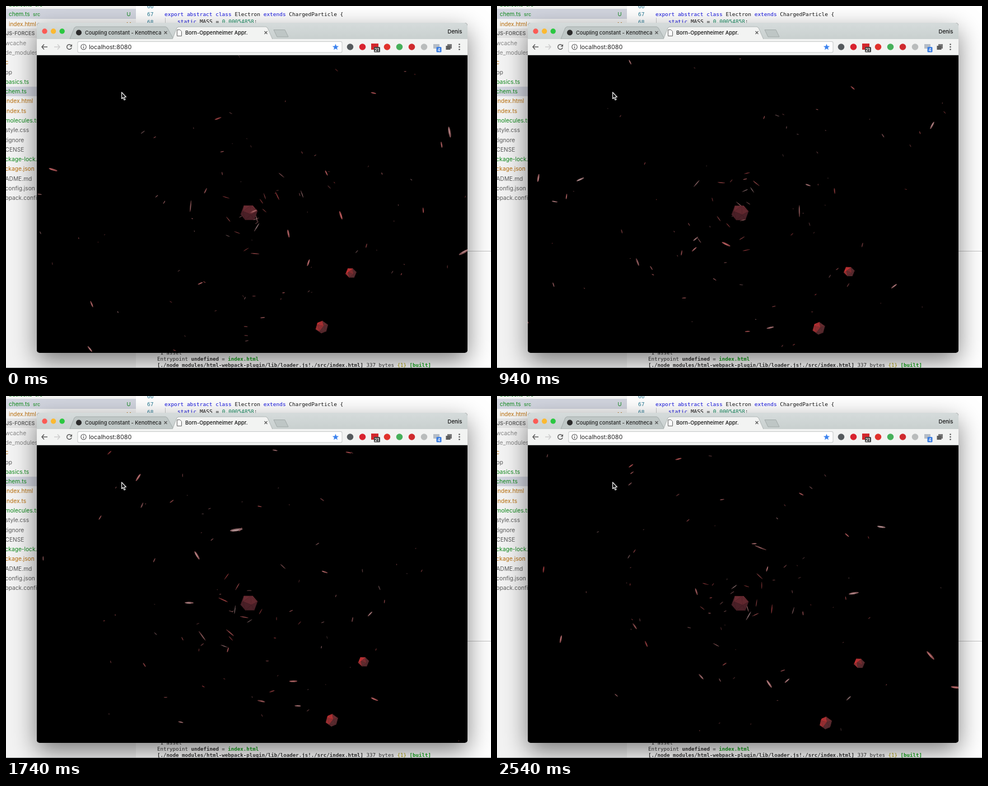
Write an HTML page with a canvas that moves like this. It is 866 px wide and 646 px high and loops after 2560 ms.

```html
<!DOCTYPE html>
<html lang="en">
<head>
<meta charset="utf-8">
<title>Electrons</title>
<style>
html, body { margin: 0; width: 100%; height: 100%; overflow: hidden; background: #fff; }
canvas { display: block; }
</style>
</head>
<body>
<canvas id="stage" width="866" height="646"></canvas>
<script>
const W = 866, H = 646, LOOP = 2560, STEP = 20, TAU = 2 * Math.PI;
const VIEW = { x: 55, y: 88, w: 769, h: 530 };
const CENTER = { x: 434, y: 369 };
const UI = 'Inter, Roboto, sans-serif';
const MONO = '"DejaVu Sans Mono", monospace';
const ctx = document.getElementById('stage').getContext('2d');
const backdrop = document.createElement('canvas');
backdrop.width = W;
backdrop.height = H;
const g = backdrop.getContext('2d');

// ---------- static desktop ----------
function box(x, y, w, h, color) {
  g.fillStyle = color;
  g.fillRect(x, y, w, h);
}

function rounded(x, y, w, h, r, color) {
  g.fillStyle = color;
  g.beginPath();
  g.roundRect(x, y, w, h, r);
  g.fill();
}

function disc(x, y, r, color) {
  g.fillStyle = color;
  g.beginPath();
  g.arc(x, y, r, 0, TAU);
  g.fill();
}

function shape(points, fill, stroke, c = g) {
  c.beginPath();
  points.forEach(([x, y]) => c.lineTo(x, y));
  c.closePath();
  if (fill) { c.fillStyle = fill; c.fill(); }
  if (stroke) { c.strokeStyle = stroke; c.stroke(); }
}

function line(points, color, width = 1) {
  g.strokeStyle = color;
  g.lineWidth = width;
  g.beginPath();
  points.forEach(([x, y]) => g.lineTo(x, y));
  g.stroke();
}

function text(str, x, y, size, color, family = UI, weight = 400) {
  g.font = `${weight} ${size}px ${family}`;
  g.fillStyle = color;
  g.fillText(str, x, y);
  return x + g.measureText(str).width;
}

function codeLine(parts, x, y, size) {
  for (const [str, color, weight] of parts) x = text(str, x, y, size, color, MONO, weight);
}

function drawEditor() {
  const green = '#108a1c', orange = '#b96f0c', gray = '#858585', dark = '#5c5c5c';
  box(0, 0, W, H, '#fff');
  box(0, 0, 232, H, '#f3f3f3');
  box(0, 5, 232, 18, '#d2d5df');
  box(0, 40, 232, 17, '#e4e4e4');
  box(0, 144, 232, 17, '#d2d5df');
  text('basics.ts', 5, 1, 10, green);
  text('src', 52, 1, 9, green);
  text('chem.ts', 5, 17.5, 10, green);
  text('src', 48, 17.5, 9, green);
  text('U', 215.5, 17.5, 9.5, green);
  text('index.html', 5, 35.5, 10, orange);
  text('M', 215, 35.5, 9.5, orange);
  text('JS-FORCES', 0, 52, 9, '#606060', UI, 600);
  const tree = [
    ['wcache', gray], ['de_modules', gray], ['c', orange], ['pp', dark],
    ['basics.ts', green], ['chem.ts', green], ['index.html', orange], ['index.ts', orange],
    ['molecules.ts', green], ['style.css', dark], ['tignore', dark], ['CENSE', dark],
    ['ckage-lock.json', green], ['ckage.json', orange], ['ADME.md', dark],
    ['config.json', dark], ['bpack.config', dark]
  ];
  tree.forEach(([name, color], i) => text(name, -1.5, 69.8 + i * 17.28, 10.2, color));

  const blue = '#1010e0', black = '#111';
  ['66', '67', '68'].forEach((n, i) => text(n, 252, 3.5 + i * 14, 9.47, '#237893', MONO));
  codeLine([['export abstract class ', blue], ['Electron ', black], ['extends ', blue],
    ['ChargedParticle {', black]], 283, 17.5, 9.47);
  codeLine([['static ', blue], ['MASS = ', black], ['0.00054858', '#09885a'], [';', black]], 306, 31.3, 9.47);
  box(284, 21, 1, 10, '#d0d0d0');

  box(232, 437, W - 232, 1, '#c4c4c4');
  const out = '#333', lime = '#12a81a';
  codeLine([[' 1 asset', out]], 270, 622, 9.13);
  codeLine([['Entrypoint ', out], ['undefined', out, 700], [' = ', out], ['index.html', lime, 700]], 270, 633.3, 9.13);
  codeLine([['[./node_modules/html-webpack-plugin/lib/loader.js!./src/index.html]', out, 700],
    [' 337 bytes ', out], ['{1}', '#b0a000'], [' [built]', lime, 700]], 270, 644.3, 9.13);
  box(0, 645, W, 1, '#9fa3a6');
}

function drawTabs() {
  const bar = g.createLinearGradient(0, 30, 0, 59);
  bar.addColorStop(0, '#d5dbdb');
  bar.addColorStop(1, '#c9d0cf');
  rounded(55, 30, 769, 40, [5, 5, 0, 0], bar);
  ['#fb5b55', '#fcb930', '#2ac840'].forEach((c, i) => disc(69 + i * 15.6, 45, 4.7, c));
  g.lineWidth = 1;
  shape([[114, 59], [122, 39], [125, 37], [285, 37], [288, 39], [299, 59]], '#c0c8c7', '#a3abaa');
  shape([[478, 42.5], [498, 42.5], [504, 55], [484, 55]], '#bec6c5', '#a3abaa');
  shape([[297, 59.5], [305, 39], [308, 37], [464, 37], [467, 39], [476, 59.5]], '#f2f3f2', '#b0b7b6');
  box(55, 59, 769, 29, '#f2f3f2');
  disc(130, 47.5, 5, '#2b2b2b');
  text('Coupling constant - Kenotheca', 141, 51, 9.2, '#222', UI, 500);
  shape([[305.5, 42.5], [310.5, 42.5], [313.5, 45.5], [313.5, 53.5], [305.5, 53.5]], '#fff', '#666');
  text('Born-Oppenheimer Appr.', 320, 51, 9.25, '#111', UI, 500);
  for (const x of [285, 464]) {
    line([[x - 2.5, 45], [x + 2.5, 50]], '#555', 1.1);
    line([[x + 2.5, 45], [x - 2.5, 50]], '#555', 1.1);
  }
  text('Denis', 788.5, 49, 9.6, '#111', UI, 500);
}

function arrow(x, dir, color) {
  line([[x - 5, 73], [x + 5, 73]], color, 1.4);
  line([[x + dir, 68.5], [x + 5 * dir, 73], [x + dir, 77.5]], color, 1.4);
}

function drawToolbar() {
  arrow(69, -1, '#555');
  arrow(91, 1, '#ccc');
  g.strokeStyle = '#555';
  g.lineWidth = 1.4;
  g.beginPath();
  g.arc(113, 73, 4.3, 0.3, 5.4);
  g.stroke();
  shape([[118, 68], [118, 72.5], [113.5, 72.5]], '#555');

  rounded(127.5, 63, 473, 20.5, 3, '#c5c9c8');
  rounded(128.5, 64, 471, 18.5, 2, '#fff');
  g.lineWidth = 1.1;
  g.strokeStyle = '#555';
  g.beginPath();
  g.arc(138.5, 73, 4.7, 0, TAU);
  g.stroke();
  box(138, 72.3, 1.2, 3.4, '#555');
  box(138, 70, 1.2, 1.2, '#555');
  text('localhost:8080', 148, 77, 10.8, '#222');
  shape(Array.from({ length: 10 }, (_, i) => {
    const a = i * TAU / 10 - TAU / 4, r = i % 2 ? 2.5 : 6;
    return [588.5 + r * Math.cos(a), 73.5 + r * Math.sin(a)];
  }), '#3b82ee');

  ['#555a5d', '#d8232f', '#d3282d', '#e0322b', '#45b05a', '#cf2a2e', '#b9bcbc'].forEach((color, i) => {
    const x = 614.5 + i * 22;
    if (i === 2) box(x - 6.5, 67, 13, 11, color);
    else disc(x, 73, 5.8, color);
  });
  box(763, 68, 11, 8, '#b5bdc6');
  rounded(657, 73, 11, 9.5, 1.5, '#444');
  text('21', 658, 80.7, 7.5, '#fff', UI, 600);
  rounded(768.5, 73, 9, 9.5, 1.5, '#3a7de0');
  text('4', 770.6, 80.7, 7.5, '#fff', UI, 600);
  box(788, 68, 8, 8, '#777');
  box(785.5, 71, 8, 7, '#5c5c5c');
  [68.5, 73, 77.5].forEach(y => disc(809.5, y, 1.3, '#555'));
}

function drawDesktop() {
  drawEditor();
  g.save();
  g.shadowColor = 'rgba(0,0,0,.5)';
  g.shadowBlur = 44;
  g.shadowOffsetY = 15;
  rounded(55, 30, 769, 589, 5, '#000');
  g.restore();
  drawTabs();
  drawToolbar();
  box(VIEW.x, 87, VIEW.w, 1, '#b8bcbb');
}

// ---------- electrons ----------
function randomizer(seed) {
  return () => {
    seed = (seed * 1664525 + 1013904223) % 4294967296;
    return seed / 4294967296;
  };
}
const rand = randomizer(77);

// Smooth curve through evenly or unevenly timed values.
function curve(times, values, t) {
  return values.reduce((sum, v, i) => sum + times.reduce(
    (p, ti, j) => j === i ? p : p * (t - ti) / (times[i] - ti), v), 0);
}

// The most visible electrons: where each one is at four moments.
const MOMENTS = [0, 940, 1740, 2540];
const flights = [
  [[792, 225], [709, 500], [521, 553], [398, 507]],
  [[818, 439], [488, 574], [312, 582], [213, 534]],
  [[347, 495], [334, 521], [513, 509], [820, 520]],
  [[386, 299], [443, 309], [569, 314], [774, 463]],
  [[84, 292], [409, 425], [658, 541], [829, 596]],
  [[909, -155], [777, 213], [650, 389], [518, 508]],
  [[153, 532], [124, 340], [168, 217], [241, 137]],
  [[60, 336], [103, 349], [327, 369], [637, 352]]
].map(points => ({
  warmth: rand(), size: 1, slim: 0.21, glow: 0.95,
  at: t => ({
    x: curve(MOMENTS, points.map(p => p[0]), t),
    y: curve(MOMENTS, points.map(p => p[1]), t),
    scale: 1
  })
}));

function unitVector() {
  const z = rand() * 2 - 1, a = rand() * TAU, r = Math.sqrt(1 - z * z);
  return [r * Math.cos(a), r * Math.sin(a), z];
}

const cross = (a, b) => a.map((_, i) =>
  a[(i + 1) % 3] * b[(i + 2) % 3] - a[(i + 2) % 3] * b[(i + 1) % 3]);

// A circular orbit in a random plane, seen in perspective.
function orbit() {
  const a = unitVector(), b = cross(a, unitVector()), len = Math.hypot(...b);
  const radius = 20 + 480 * rand(), phase = rand() * TAU, speed = 0.2 + 0.14 * rand();
  const inner = radius < 110;
  return {
    warmth: rand(),
    size: inner ? 0.7 + 0.8 * rand() : 0.2 + 0.6 * rand() ** 1.5,
    slim: inner ? 0.11 : 0.22,
    glow: inner ? 0.65 : 0.5 + 0.4 * rand(),
    at(t) {
      const angle = phase + t * speed / radius, c = Math.cos(angle), s = Math.sin(angle) / len;
      const [x, y, z] = a.map((v, i) => radius * (v * c + b[i] * s));
      const scale = 1500 / (1500 + z);
      return { x: CENTER.x + x * scale, y: CENTER.y + y * scale, scale };
    }
  };
}
const swarm = Array.from({ length: 112 }, orbit);

function ellipse(x, y, rx, ry, color) {
  ctx.fillStyle = color;
  ctx.beginPath();
  ctx.ellipse(x, y, rx, ry, 0, 0, TAU);
  ctx.fill();
}

// Electrons point along their path and look longer the faster they move.
function drawElectron(p, t) {
  const here = p.at(t), next = p.at(t + 10);
  const dx = next.x - here.x, dy = next.y - here.y;
  const depth = here.scale ** 2;
  const length = Math.max(1.6, (3 + 3.7 * Math.hypot(dx, dy)) * p.size * depth);
  const width = Math.max(1.3, length * p.slim);
  const cool = 1 - p.warmth;
  ctx.save();
  ctx.translate(here.x, here.y);
  ctx.rotate(Math.atan2(dy, dx));
  ctx.globalAlpha = Math.min(1, p.glow * depth);
  ellipse(0, 0, length / 2, width / 2, `rgb(${155 - 20 * cool},${58 + 42 * cool},${60 + 42 * cool})`);
  if (length > 9) {
    ellipse(-length * 0.08, width * 0.1, length * 0.3, width * 0.13,
      `rgb(210,${85 + 110 * cool},${85 + 110 * cool})`);
  }
  ctx.restore();
}

// ---------- nuclei: flat-shaded icosahedra ----------
const GOLD = (1 + Math.sqrt(5)) / 2;
const corners = [];
for (const a of [-1, 1]) for (const b of [-GOLD, GOLD]) corners.push([0, a, b], [a, b, 0], [b, 0, a]);
const touching = (p, q) => Math.abs(Math.hypot(...p.map((v, i) => v - q[i])) - 2) < 0.01;
const faces = [];
corners.forEach((p, i) => corners.slice(i + 1).forEach((q, j) =>
  corners.slice(i + j + 2).forEach(r => {
    if (touching(p, q) && touching(q, r) && touching(p, r)) faces.push([p, q, r]);
  })));

function turned([x, y, z], tilt, spin) {
  const y2 = y * Math.cos(tilt) - z * Math.sin(tilt), z2 = y * Math.sin(tilt) + z * Math.cos(tilt);
  return [x * Math.cos(spin) + z2 * Math.sin(spin), y2, z2 * Math.cos(spin) - x * Math.sin(spin)];
}

function drawNucleus(x, y, radius, tilt, spin, light, shade) {
  const k = radius / Math.hypot(1, GOLD);
  ctx.lineWidth = 0.4;
  for (const face of faces) {
    const pts = face.map(p => turned(p, tilt, spin));
    const normal = [0, 1, 2].map(i => pts.reduce((sum, p) => sum + p[i], 0));
    if (normal[2] <= 0) continue;
    const size = Math.hypot(...normal);
    const lit = Math.max(0, normal.reduce((sum, v, i) => sum + v * light[i], 0) / size);
    const color = shade(lit);
    shape(pts.map(p => [x + p[0] * k, y + p[1] * k]), color, color, ctx);
  }
}

const dimShade = l => `rgb(${74 + 40 * l},${32 + 14 * l},${39 + 14 * l})`;
const redShade = l => `rgb(${88 + 118 * l},${42 + 8 * l},${46 + 6 * l})`;
const DIM_LIGHT = [0.1, -0.9, 0.3], RED_LIGHT = [-0.75, -0.6, 0.25];

function drawNuclei(t) {
  const along = values => curve([0, 1400, 2540], values, t);
  drawNucleus(CENTER.x, CENTER.y + t / 2540, 15.8, 0.35, 0.25 + t * 2e-5, DIM_LIGHT, dimShade);
  drawNucleus(along([616, 634.5, 647]), along([476.5, 474, 477]), 9.7,
    0.3, 0.5 + t * 4e-5, RED_LIGHT, redShade);
  drawNucleus(along([564, 579, 587]), along([573, 577, 583.5]), 11.6,
    0.7, 0.3 - t * 4e-5, RED_LIGHT, redShade);
}

function drawCursor() {
  ctx.lineWidth = 1.2;
  ctx.lineJoin = 'round';
  shape([[206.5, 154], [206.5, 165.5], [209, 163.2], [211, 167.8], [213, 166.9],
    [211, 162.5], [214.5, 162.5]], '#111', '#eee', ctx);
}

function render(t) {
  ctx.drawImage(backdrop, 0, 0);
  ctx.save();
  ctx.beginPath();
  ctx.roundRect(VIEW.x, VIEW.y, VIEW.w, VIEW.h, [0, 0, 4, 4]);
  ctx.clip();
  ctx.fillStyle = '#000';
  ctx.fill();
  const near = p => p.at(t).scale > 1;
  swarm.filter(p => !near(p)).forEach(p => drawElectron(p, t));
  drawNuclei(t);
  swarm.filter(near).forEach(p => drawElectron(p, t));
  flights.forEach(p => drawElectron(p, t));
  ctx.restore();
  drawCursor();
}

drawDesktop();
const start = performance.now();
function tick() {
  const elapsed = (performance.now() - start) % LOOP;
  render(Math.floor(elapsed / STEP) * STEP);
  requestAnimationFrame(tick);
}
tick();
</script>
</body>
</html>
```
